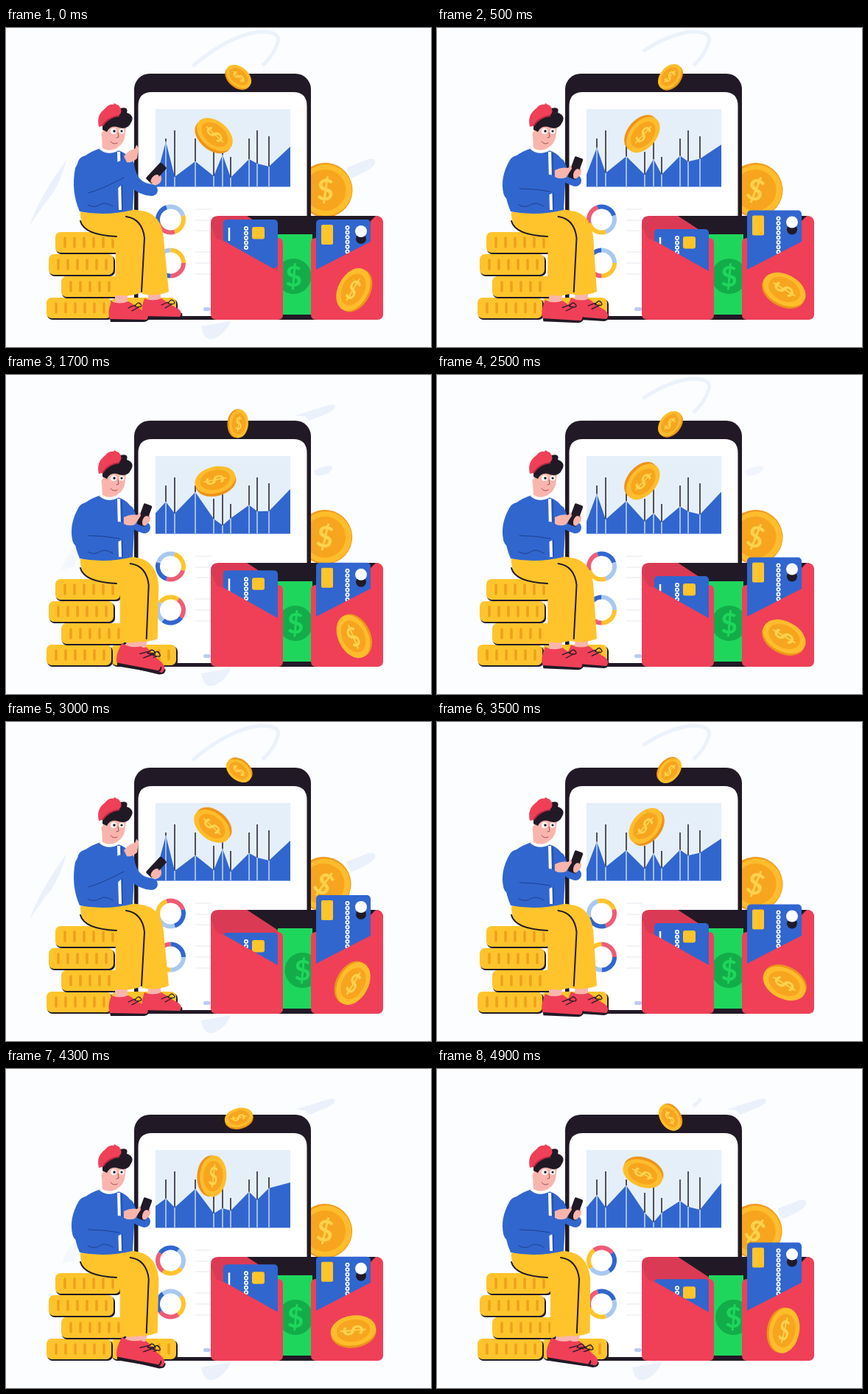
Animation, 577 px wide and 433 px high, one loop 5000 ms. Source, as an HTML page:

```html
<!DOCTYPE html>
<html lang="en">
<head>
<meta charset="utf-8">
<title>Mobile finance</title>
<style>
  html, body { margin: 0; width: 100%; height: 100%; overflow: hidden; background: #fcfdff; }
  svg { display: block; width: 100vw; height: 100vh; }
  text { font: 700 34px Lato, "Open Sans", sans-serif; text-anchor: middle; }
  .blue { fill: #3166cf; } .red { fill: #ef4058; } .dark { fill: #211a26; }
  .yellow { fill: #ffc42c; } .skin { fill: #f9b5ad; } .white { fill: #fff; }
  .pen { fill: none; stroke: #211a26; stroke-width: 1.5; stroke-linecap: round; stroke-linejoin: round; }
  .seam { fill: none; stroke: #1f3f8c; stroke-linecap: round; }
  .sleeve { fill: none; stroke: #3166cf; stroke-linecap: round; stroke-linejoin: round; }
  .dots { stroke: #fff; stroke-width: 6; stroke-linecap: round; stroke-dasharray: 0 6.5; }
  .holes { stroke: #3166cf; stroke-width: 2.5; stroke-linecap: round; stroke-dasharray: 0 6.5; }
  .air { fill: #eaf1fa; }
</style>
</head>
<body>
<svg viewBox="0 0 577 433" preserveAspectRatio="none">
  <!-- light swooshes -->
  <path id="loop" pathLength="1" d="M253 52Q301 11 344 5Q376 4 368 22Q362 39 348 51" fill="none" stroke="#ebf2fa" stroke-width="5" stroke-dasharray="1 1"/>
  <path id="airTop" class="air" d="M393 55L434 42Q447 38 447 43Q446 48 434 53L412 62L406 56Z"/>
  <path id="airRight" class="air" d="M418 130Q428 124 441 123Q446 127 438 133Q428 138 420 136Z"/>
  <path id="airSide" class="air" d="M462 190L492 178Q503 176 501 184Q496 193 468 204Z"/>
  <path id="airLeft" class="air"/>
  <path id="airLow" class="air" d="M265 405L305 398Q300 413 284 421Q269 427 265 405Z"/>

  <g id="backCoin">
    <circle r="37" fill="#f39a1c"/><circle cx="1" r="35" fill="#ffbd2b"/>
    <circle r="28" fill="#f7a51f"/>
    <text y="14" style="font-size:40px" fill="#ffd24d">$</text>
  </g>

  <!-- phone -->
  <rect class="dark" x="174" y="62" width="240" height="334" rx="21"/>
  <path fill="#fff" d="M179.500 391V106Q179.500 87 198 87H390Q408.500 87 408.500 106V391Z"/>
  <rect x="203" y="110" width="183" height="105.500" fill="#e5effa"/>
  <path id="bars" class="pen" style="stroke-linecap:butt"/>
  <path id="chart" class="blue"/>
  <path id="stems" fill="none" stroke="#dce8f8" stroke-width="1.300"/>
  <path d="M257 246H279M257 261H279M257 275H279M257 304H279M257 319H279M257 334H279" stroke="#e6e8ef"/>
  <rect x="268" y="379" width="10" height="5" rx="2.500" fill="#b9cdf0"/>
  <g id="ringA"></g><g id="ringB"></g>

  <!-- wallet -->
  <rect class="dark" x="283" y="255" width="229" height="141" rx="10"/>
  <path fill="#db3a55" d="M278 300V265Q278 255 288 255H327L376 287V335Z"/>
  <path class="red" d="M495 262L502 255Q512 255 512 265V300H495Z"/>
  <rect x="369" y="280" width="47" height="109" fill="#1fd65d"/>
  <g id="bill"><circle r="24" fill="#12ad49"/><text y="14" style="font-size:39px" fill="#1fd65d">$</text></g>
  <g id="cardL">
    <rect class="blue" x="295" width="74" height="66" rx="5"/>
    <path d="M303 11V29" stroke="#fff" stroke-width="2.500"/>
    <path class="dots" d="M326 12V42"/><path class="holes" d="M326 12V42"/>
    <rect class="yellow" x="334" y="10" width="17" height="16.500" rx="3"/>
  </g>
  <g id="cardR">
    <rect class="blue" x="421" width="74" height="110" rx="5"/>
    <rect class="yellow" x="428" y="7" width="16" height="27" rx="2"/>
    <path class="dots" d="M463.500 11V70"/><path class="holes" d="M463.500 11V70"/>
    <circle class="dark" cx="482" cy="26" r="7"/><circle class="white" cx="482" cy="16" r="8"/>
  </g>
  <path class="red" d="M278 268L286 286L296 289L369 330V285Q376 285 376 292V389Q376 396 369 396H286Q278 396 278 388Z"/>
  <path class="red" d="M414 292Q414 285 421 285V328L495 290L512 283V388Q512 396 504 396H421Q414 396 414 389Z"/>

  <!-- seated reader -->
  <g id="stack"></g>
  <g id="shoeFar"></g>
  <path id="legFar" class="yellow"/>
  <g id="shoeNear"></g>
  <path id="legNear" class="yellow"/>
  <path id="fold" class="pen" style="stroke-width:2"/>
  <path class="pen" style="stroke-width:2" d="M101 262Q106 281 150 283"/>

  <path class="skin" d="M130 145L131 166Q143 176 152 167L150 150Z"/>
  <path class="blue" d="M129 163Q103 171 94 190Q88 222 100 249Q135 256 172 247L175 195Q172 172 152 166Q140 172 129 163Z"/>
  <path d="M128 163Q139 172 153 164M153 168L155 247" fill="none" stroke="#fff" stroke-width="4"/>
  <path class="seam" d="M157 170L158 247M111 240Q120 245 127 240T145 242"/>
  <path class="skin" d="M132 132Q130 156 140 162Q156 166 161 149L164 128L140 122Z"/>
  <path class="dark" d="M131 128Q148 119 155 109Q167 106 164 115Q175 119 170 128Q165 139 153 135Q142 131 137 141L131 138Z"/>
  <path class="red" d="M126 134Q122 118 135 109Q140 101 153 105Q160 113 153 119Q139 122 131 133Z"/>
  <path d="M131 133Q138 121 154 119" fill="none" stroke="#b92943" stroke-width="2"/>
  <path class="red" d="M145 107L147 102L152 105Z"/>
  <circle class="white" cx="146" cy="140" r="4"/><circle class="white" cx="157" cy="140" r="3.500"/>
  <circle class="dark" cx="147" cy="140" r="1.800"/><circle class="dark" cx="157" cy="140" r="1.600"/>
  <path class="pen" d="M152 142L153 148L150 149M142 154Q146 159 151 156" style="stroke-width:1;stroke:#a34d5a"/>
  <ellipse class="skin" cx="133" cy="145" rx="3.500" ry="5"/>
  <path id="armFar" class="sleeve" stroke-width="16"/>
  <g id="handFar"><ellipse class="skin" rx="7" ry="8"/></g>
  <g id="device"><rect class="dark" x="-6" y="-15" width="12" height="30" rx="2"/><ellipse class="skin" cx="4" cy="7" rx="4" ry="7"/></g>
  <path id="armNear" class="sleeve" stroke-width="26"/>
  <path id="crease" class="seam"/>
  <g id="handNear"><path class="skin" d="M-9 -4Q0 -9 9 -7L13 -11L14 -6L6 6Q-3 9 -9 5Z"/></g>

  <g id="coinTop"></g><g id="coinBig"></g><g id="coinWallet"></g>
</svg>
<script>
const el = id => document.getElementById(id);
const set = (id, name, value) => el(id).setAttribute(name, value);
const place = (id, x, y, turn = 0, size = 1) =>
  set(id, 'transform', `translate(${x} ${y}) rotate(${turn}) scale(${size})`);
const mix = (a, b, k) => a + (b - a) * k;
const wave = (t, period) => Math.cos(2 * Math.PI * t / period);
const ease = k => k * k * (3 - 2 * k);
const clamp = k => Math.max(0, Math.min(1, k));

const barX = [203, 217, 229, 257, 282, 294, 305, 330, 341, 357, 386];
const barTop = [0, 150, 139, 150, 168, 150, 175, 150, 139, 147];
const levels = [
  [0, [207, 154, 202, 181, 201, 172, 203, 178, 184, 188, 161]],
  [1200, [186, 176, 188, 163, 196, 188, 192, 166, 177, 160, 154]],
  [1900, [188, 171, 188, 158, 195, 208, 195, 179, 187, 191, 155]]
];
levels.push([3000, levels[0][1]]);
const uprights = tops => barTop.map((y, i) => y ? `M${barX[i]} ${tops[i]}V215` : '').join('');
set('bars', 'd', uprights(barTop));

// a tilted coin: rim below, face on top
function makeCoin(id, rx, ry, depth, dx) {
  el(id).innerHTML = `<g transform="translate(${dx} 0)">
    <ellipse cy="${depth}" rx="${rx}" ry="${ry}" fill="#ee941b"/>
    <ellipse rx="${rx}" ry="${ry}" fill="#ffbd2b"/>
    <ellipse rx="${rx * .74}" ry="${ry * .74}" fill="#f7a51f"/>
    <text transform="scale(${rx / 28} ${ry / 28}) rotate(-90)" y="12" fill="#ffd24d">$</text></g>`;
}
makeCoin('coinTop', 19.5, 13, 2.5, 0);
makeCoin('coinBig', 28, 18, 4, 2.5);
makeCoin('coinWallet', 31, 20.5, 3, 0);

function makeRing(id) {
  el(id).innerHTML = ['#ffc42c', '#ef5c75', '#3166cf', '#a9c8f0'].map((color, i) =>
    `<circle r="17.500" fill="none" stroke="${color}" stroke-width="6" pathLength="100"
      stroke-dasharray="25 75" stroke-dashoffset="${-25 * i}"/>`).join('');
}
makeRing('ringA');
makeRing('ringB');

const stack = [[143, 366], [55, 366], [75, 337], [58, 307], [67, 277]];
el('stack').innerHTML = stack.map(([x, y]) => {
  let stripes = '';
  for (let i = 0; i < 6; i++) stripes += `M${x + 13 + i * 13} ${y + 8}v12`;
  return `<rect class="dark" x="${x + 1}" y="${y + 2}" width="89" height="28" rx="7"/>
    <rect class="yellow" x="${x}" y="${y}" width="88" height="28" rx="7"/>
    <path d="${stripes}" stroke="#f09f1d" stroke-width="3.500" stroke-linecap="round"/>`;
}).join('');

for (const id of ['shoeNear', 'shoeFar']) el(id).innerHTML =
  `<path class="skin" d="M-10 -4H7V8H-10Z"/>
   <path class="dark" d="M-18 23L36 24Q38 30 30 32H-16Z"/>
   <path class="red" d="M-15 4Q-21 20 -17 28L33 29Q39 21 25 15L8 4Q-4 9 -15 4Z"/>
   <path class="pen" d="M8 13L17 9M13 17L22 12M17 11q4 -8 8 -3t-8 3" style="stroke-width:1.200"/>`;

const leg = (knee, ankle, hem) =>
  `M101 250Q150 241 ${knee - 24} 249Q${knee - 2} 255 ${knee + 1} 285L${ankle + 18} ${hem - 3}` +
  `Q${ankle} ${hem + 4} ${ankle - 18} ${hem}L${knee - 38} 291Q145 282 128 282Q101 278 101 250Z`;

function drawChart(t) {
  const k = levels.findIndex(l => l[0] > t);
  const [start, from] = levels[k - 1], [end, to] = levels[k];
  const part = ease((t - start) / (end - start));
  const tops = from.map((y, i) => mix(y, to[i], part));
  set('chart', 'd', `M203 215.500${tops.map((y, i) => `L${barX[i]} ${y}`).join('')}V215.500Z`);
  set('stems', 'd', uprights(tops));
}

function drawReader(u) {
  const s = (1 - wave(u, 3000)) / 2;
  const p = ease(clamp(1 - Math.abs(u) / 450));
  const near = mix(166, 173, s), far = mix(203, 187, s), knee = mix(187, 193, s);
  const size = mix(1, 1.15, s);
  set('legNear', 'd', leg(knee, near, 362));
  set('legFar', 'd', leg(mix(213, 206, s), far, 361));
  set('fold', 'd', `M${knee - 24} 256Q${knee - 2} 259 ${knee + 1} 285L${near + 18} 358`);
  place('shoeNear', mix(158, 176, s), mix(367, 362, s), 10 * s, size);
  place('shoeFar', mix(203, 182, s), 363, 14 * s, size);

  const wx = mix(157, 163, p), wy = mix(207, 188, p);
  const ex = mix(103, 118, p), ey = mix(222, 224, p);
  set('armNear', 'd', `M110 186Q${mix(99, 105, p)} 205 ${ex} ${ey}Q135 ${mix(221, 219, p)} ${wx - 5} ${wy + 5}`);
  set('crease', 'd', `M112 ${mix(218, 224, p)}Q132 218 ${wx - 3} ${wy + 15}`);
  place('handNear', mix(169, 170, p), mix(197, 174, p), mix(0, -25, p));
  set('armFar', 'd', `M166 185Q170 ${mix(202, 218, p)} ${mix(188, 198, p)} ${mix(207, 220, p)}`);
  place('handFar', mix(189, 204, p), mix(195, 205, p), 20);
  place('device', mix(188, 204, p), mix(190, 197, p), mix(20, 43, p));
}

function drawAir(t, u) {
  const near = Math.abs(u);
  const fade = (id, amount) => set(id, 'opacity', clamp(amount));
  set('loop', 'stroke-dashoffset', -clamp((near / 1150) ** 2));
  fade('airTop', (near - 800) / 250);
  fade('airRight', Math.min((t - 700) / 400, (2900 - t) / 600));
  fade('airSide', (Math.abs(wave(t, 2000)) - .7) * 5);
  fade('airLow', (wave(t, 1000) + .7) * 3);
  // the left swoosh shows in front, then slips away behind the seat
  if (near < 800) {
    set('airLeft', 'd', 'M32 268Q45 230 82 179Q72 218 52 239Z');
    fade('airLeft', 1 - near / 480);
  } else {
    set('airLeft', 'd', 'M76 264Q82 242 101 229L94 260Z');
    fade('airLeft', 1 - (1500 - near) / 350);
  }
}

function draw(t) {
  const phase = t % 3000, u = phase > 1500 ? phase - 3000 : phase;
  const sway = wave(t, 2000), spin = t * .18;
  drawChart(phase);
  drawReader(u);
  drawAir(t, u);
  place('cardR', 0, 247.5 + 12.5 * sway);
  place('cardL', 0, 273 - 13 * sway);
  place('bill', 396.5 - 6 * sway, 337);
  place('backCoin', 432.5 + sway, 220, 17 - 14 * sway);
  place('coinTop', 316, 66, 40 - spin);
  place('coinBig', 281.5, 143, 40 + spin);
  place('coinWallet', 471.5, 355, -62 + spin);
  place('ringA', 223.5, 260, spin - 18);
  place('ringB', 223.5, 319, spin - 90);
}

const begin = performance.now();
function tick(now) {
  const t = Math.max(0, now - begin) % 5000;
  draw(Math.floor(t / 100) * 100);
  requestAnimationFrame(tick);
}
draw(0);
requestAnimationFrame(tick);
</script>
</body>
</html>
```
